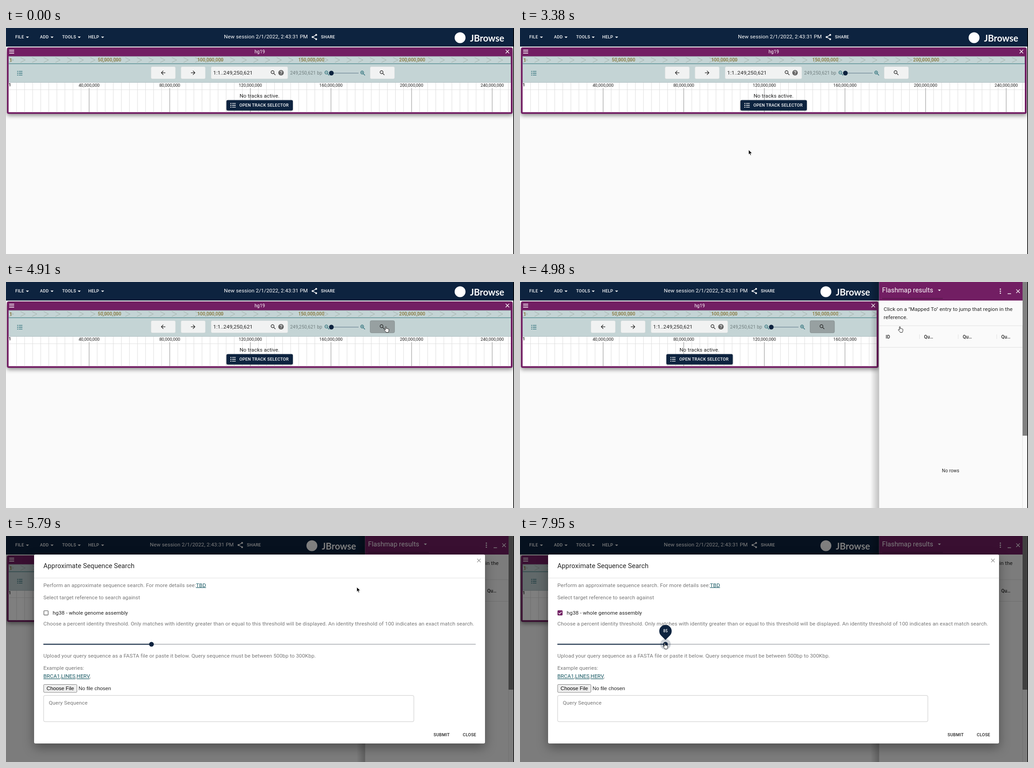
Recreate the animation shown at these times as an HTML page. Size 1121 by 500 pixels, loop 8000 ms.

```html
<!DOCTYPE html>
<html lang="en">
<head>
<meta charset="utf-8">
<title>Sequence search</title>
<style>
  html, body { margin: 0; width: 100%; height: 100%; overflow: hidden; background: #fafafa; }
  svg#stage { position: absolute; left: 0; top: 0; width: 1121px; height: 500px; }
  text { font-family: Roboto, sans-serif; white-space: pre; }
  .b1 { font-size: 11.63px; letter-spacing: .00938em; }
  .b2 { font-size: 10.18px; letter-spacing: .01071em; }
  .btn { font-size: 9.4px; font-weight: 500; letter-spacing: .02857em; }
  .h6 { font-size: 14.54px; letter-spacing: .0075em; }
  .arial { font: 11.35px "Liberation Sans", Arial, sans-serif; }
  .tick { font-size: 9.45px; }
  .brand { font: 700 20px Lato, sans-serif; }
  .c { text-anchor: middle; }
  .strong { font-weight: 500; }
  .white { fill: #fff; }
  .ink { fill: #212121; }
  .soft { fill: #757575; }
  .navy { fill: #0d233f; }
  .grape { fill: #721e63; }
  .teal { fill: #2b6f79; }
  .link { fill: #135560; text-decoration: underline; }
  .olive { fill: #867638; }
  .line { fill: none; stroke: #e0e0e0; }
  .box { fill: #f1f2f2; stroke: #d3dbdb; stroke-width: .8; }
  .frame { width: 1116px; filter: drop-shadow(0 4px 5px rgba(0,0,0,.42)); }
  .inner { width: 1108.5px; }
  .open .frame { width: 789px; }
  .open .inner { width: 781.5px; }
  .open .mid { transform: translateX(-163.5px); }
  .open .end { transform: translateX(-327px); }
  #drawer { display: none; }
  .open #drawer { display: inline; }
  #paper { filter: drop-shadow(0 9px 12px rgba(0,0,0,.36)); }
  #tip { transform-origin: 321px 230px; }
</style>
</head>
<body>
<svg id="stage" viewBox="0 0 1121 500">
  <defs>
    <symbol id="search" viewBox="0 0 24 24"><path d="M15.5 14h-.79l-.28-.27C15.41 12.59 16 11.11 16 9.5 16 5.91 13.09 3 9.5 3S3 5.91 3 9.5 5.91 16 9.5 16c1.61 0 3.09-.59 4.23-1.57l.27.28v.79l5 4.99L20.49 19l-4.99-5zm-6 0C7.01 14 5 11.99 5 9.5S7.01 5 9.5 5 14 7.01 14 9.5 11.99 14 9.5 14z"/></symbol>
    <symbol id="share" viewBox="0 0 24 24"><path d="M18 5 6 12l12 7" fill="none" stroke="#fff" stroke-width="2"/><circle cx="18" cy="5" r="3"/><circle cx="6" cy="12" r="3"/><circle cx="18" cy="19" r="3"/></symbol>
    <symbol id="back" viewBox="0 0 24 24"><path d="M20 11H7.83l5.59-5.59L12 4l-8 8 8 8 1.41-1.41L7.83 13H20v-2z"/></symbol>
    <symbol id="next" viewBox="0 0 24 24"><path d="M12 4l-1.41 1.41L16.17 11H4v2h12.17l-5.58 5.59L12 20l8-8z"/></symbol>
    <symbol id="help" viewBox="0 0 24 24"><path d="M12 2C6.48 2 2 6.48 2 12s4.48 10 10 10 10-4.48 10-10S17.52 2 12 2zm1 17h-2v-2h2v2zm2.07-7.75l-.9.92C13.45 12.9 13 13.5 13 15h-2v-.5c0-1.1.45-2.1 1.17-2.83l1.24-1.26c.37-.36.59-.86.59-1.41 0-1.1-.9-2-2-2s-2 .9-2 2H8c0-2.21 1.79-4 4-4s4 1.79 4 4c0 .88-.36 1.68-.93 2.25z"/></symbol>
    <symbol id="close" viewBox="0 0 24 24"><path d="M19 6.41L17.59 5 12 10.59 6.41 5 5 6.41 10.59 12 5 17.59 6.41 19 12 13.41 17.59 19 19 17.59 13.41 12z"/></symbol>
    <symbol id="list" viewBox="0 0 12 10"><path d="M0 0h2.2v1.8H0zM0 4.1h2.2v1.8H0zM0 8.2h2.2V10H0zM3.7.2H12v1.4H3.7zM3.7 4.3H12v1.4H3.7zM3.7 8.4H12v1.4H3.7z"/></symbol>
    <symbol id="caret" viewBox="0 0 8 4"><path d="M0 0h8L4 4z"/></symbol>
    <clipPath id="viewClip"><rect class="inner" x="5.5" y="62.5" height="124"/></clipPath>
    <clipPath id="goClip"><rect x="803.5" y="85.5" width="54" height="27" rx="3"/></clipPath>
    <linearGradient id="edge"><stop offset="0" stop-opacity="0"/><stop offset="1" stop-opacity=".24"/></linearGradient>
  </defs>

  <rect width="1121" height="500" fill="#fafafa"/>

  <!-- app bar -->
  <rect class="navy" width="1120" height="41"/>
  <g class="white btn">
    <text x="20.5" y="23.4">FILE</text><text x="75" y="23.4">ADD</text>
    <text x="124" y="23.4">TOOLS</text><text x="181.5" y="23.4">HELP</text>
    <use href="#caret" x="43.7" y="18.7" width="7.2" height="3.6"/>
    <use href="#caret" x="98" y="18.7" width="7.2" height="3.6"/>
    <use href="#caret" x="158" y="18.7" width="7.2" height="3.6"/>
    <use href="#caret" x="209.6" y="18.7" width="7.2" height="3.6"/>
  </g>
  <g class="mid white">
    <text class="b1" x="481" y="23.4">New session 2/1/2022, 2:43:31 PM</text>
    <use href="#share" x="672.5" y="12" width="16" height="16"/>
    <text class="btn" x="695" y="23.4">SHARE</text>
  </g>
  <g class="end white">
    <circle cx="1002" cy="21.5" r="12"/>
    <text class="brand" x="1024" y="30">JBrowse</text>
  </g>

  <!-- genome view -->
  <rect class="frame grape" x="2" y="43" height="147" rx="4"/>
  <path d="M7 49h11M7 52.4h11M7 55.8h11" stroke="#fff" stroke-width="1.4"/>
  <text class="mid white b2 c" x="560" y="55.6">hg19</text>
  <use class="end white" href="#close" x="1099" y="44.5" width="15" height="15"/>
  <g clip-path="url(#viewClip)">
    <rect x="5.5" y="62.5" width="1109" height="58" fill="#c4d4d5"/>
    <path id="chevrons" fill="none" stroke="#a3b1aa" stroke-width="1"/>
    <path d="M5.5 63H1114M1113.5 63v16" stroke="#9bb3b3" stroke-width=".8"/>
    <path d="M5.5 79H1114" stroke="#5b9196" stroke-width="1.4"/>
    <text class="olive b2" x="7.5" y="74.6" font-weight="700">1</text>
    <g id="overview" class="olive b2 c strong"></g>

    <use class="teal" href="#list" x="24.5" y="95" width="12" height="10"/>
    <g class="mid">
      <rect class="box" x="320" y="85.5" width="54" height="27" rx="3"/>
      <rect class="box" x="386" y="85.5" width="54" height="27" rx="3"/>
      <rect class="box" x="452.5" y="85.5" width="169.5" height="27" rx="3"/>
      <use class="ink" href="#back" x="339.5" y="91.8" width="14.5" height="14.5"/>
      <use class="ink" href="#next" x="405.7" y="91.8" width="14.5" height="14.5"/>
      <text class="b1 ink" x="457.3" y="103.3">1:1..249,250,621</text>
      <use class="ink" href="#search" x="582.5" y="92" width="14.5" height="14.5"/>
      <use fill="#666" href="#help" x="599.7" y="91.8" width="14.5" height="14.5"/>
      <text class="b2" fill="#6f7d7e" x="627" y="103.2">249,250,621 bp</text>
      <use class="teal" href="#search" x="701.2" y="92.8" width="14.5" height="14.5"/>
      <path d="M705.2 98.5h3.6M784.2 98.5h3.6M786 96.7v3.6" stroke="#2b6f79" stroke-width=".9"/>
      <use class="teal" href="#search" x="780.2" y="92.8" width="14.5" height="14.5"/>
      <path d="M718 99.8h60" stroke="#7d93a0" stroke-width="1.4"/>
      <circle class="navy" cx="718" cy="99.8" r="5.2"/>
      <rect id="go" class="box" x="803.5" y="85.5" width="54" height="27" rx="3"/>
      <g clip-path="url(#goClip)"><circle id="ripple" cx="836" cy="99" fill-opacity=".17"/></g>
      <use class="ink" href="#search" x="823" y="92" width="14.5" height="14.5"/>
    </g>

    <rect x="5.5" y="120.5" width="1109" height="66" fill="#fff"/>
    <path d="M5.5 120.5H1114" stroke="#a9c0c1" stroke-width=".8"/>
    <path id="minor" stroke="#dedede" stroke-width="1"/>
    <path d="M5.5 136.5H1114" stroke="#dcdcdc" stroke-width=".8"/>
    <path id="major" stroke="#8f8f8f" stroke-width="1"/>
    <text class="tick" x="5.8" y="129.4" font-weight="500">1</text>
    <g id="scale" class="tick c ink"></g>

    <g class="mid">
      <text class="b1 ink c" x="559.5" y="154.3">No tracks active.</text>
      <rect class="navy" x="486.5" y="159.5" width="146.5" height="23" rx="3" style="filter:drop-shadow(0 1.5px 1.5px rgba(0,0,0,.35))"/>
      <use class="white" href="#list" x="495" y="166" width="12" height="10"/>
      <text class="btn white" x="515" y="174.2">OPEN TRACK SELECTOR</text>
    </g>
  </g>

  <g id="drawer">
    <rect x="773" width="20" height="500" fill="url(#edge)"/>
    <rect x="792.5" width="328" height="500" fill="#fafafa"/>
    <rect class="grape" x="792.5" width="317" height="41"/>
    <text class="h6 white" x="799" y="23.4">Flashmap results</text>
    <path d="M799 36.3h134" stroke="#47123e"/>
    <use class="white" href="#caret" x="922" y="16.6" width="7" height="3.5"/>
    <g class="white">
      <circle cx="1060" cy="15.8" r="1.4"/><circle cx="1060" cy="20.3" r="1.4"/><circle cx="1060" cy="24.8" r="1.4"/>
      <rect x="1076" y="25.2" width="7.5" height="1.4"/>
      <use href="#close" x="1091.5" y="12.8" width="15" height="15"/>
    </g>
    <text class="b1 ink" x="802.5" y="64.2">Click on a "Mapped To" entry to jump that region in the</text>
    <text class="b1 ink" x="802.5" y="82">reference.</text>
    <path class="line" d="M793 96.8h316M793 144.5h316M1109 97v403M881.5 116v10M967 116v10M1052 116v10"/>
    <g class="b2 ink strong">
      <text x="807" y="124.6">ID</text><text x="891.5" y="124.6">Qu…</text>
      <text x="977" y="124.6">Qu…</text><text x="1062" y="124.6">Qu…</text>
    </g>
    <text class="b2 ink c" x="950.3" y="421">No rows</text>
    <rect x="1109" width="10.5" height="340" fill="#808080"/>
  </g>

  <g id="dialog">
    <rect width="1119.5" height="500" fill-opacity=".5"/>
    <rect id="paper" class="white" x="62" y="41" width="995" height="418" rx="3"/>
    <text class="h6 ink" x="82.5" y="70.8">Approximate Sequence Search</text>
    <use fill="#8c8c8c" href="#close" x="1036.3" y="47" width="14.5" height="14.5"/>
    <path class="line" d="M62 93h995"/>
    <g class="b1 soft">
      <text x="82.5" y="112.6">Perform an approximate sequence search. For more details see:<tspan class="link">TBD</tspan></text>
      <text x="82.5" y="139.8">Select target reference to search against</text>
      <text x="82.5" y="198">Choose a percent identity threshold. Only matches with identity greater than or equal to this threshold will be displayed. An identity threshold of 100 indicates an exact match search.</text>
      <text x="82.5" y="268.7">Upload your query sequence as a FASTA file or paste it below. Query sequence must be between 500bp to 300Kbp.</text>
      <text x="82.5" y="295.8">Example queries:</text>
      <text x="82.5" y="314.4"><tspan class="link">BRCA1</tspan>,<tspan class="link">LINES</tspan>,<tspan class="link">HERV</tspan>,</text>
      <text x="94.5" y="372.5">Query Sequence</text>
    </g>
    <rect x="83.6" y="165.4" width="9.4" height="9.4" rx="1" fill="#fff" stroke="#6a6a6a" stroke-width="1.4"/>
    <g id="checked">
      <rect class="grape" x="82.8" y="164.6" width="11" height="11" rx="1.4"/>
      <path d="M85 170.2l2.4 2.4 4.4-4.7" fill="none" stroke="#fff" stroke-width="1.4"/>
    </g>
    <text class="b1 ink" x="103" y="173.8">hg38 - whole genome assembly</text>
    <path d="M82.5 239.5h954" stroke="#a3a7ad" stroke-width="1.6"/>
    <path d="M82.5 239.5H321" stroke="#0d233f" stroke-width="1.8"/>
    <circle id="halo" class="navy" cx="321" cy="239.5" r="11.7" fill-opacity=".2"/>
    <circle class="navy" cx="321" cy="239.5" r="5.2"/>
    <g id="tip">
      <path class="navy" d="M321 230l-9.7-9.8a13.7 13.7 0 1 1 19.4 0z"/>
      <text class="white c" x="321" y="213.4" font-size="8.7" font-weight="500">85</text>
    </g>
    <rect x="83" y="328.5" width="73.5" height="17.5" rx="2" fill="#efefef" stroke="#767676" stroke-width=".9"/>
    <text class="arial" x="89.5" y="341">Choose File</text>
    <text class="arial" x="160" y="341" fill="#222">No file chosen</text>
    <rect x="83" y="352.8" width="817" height="58" rx="3" fill="none" stroke="#c2c2c2" stroke-width=".9"/>
    <text class="btn ink" x="943.5" y="443.3">SUBMIT</text>
    <text class="btn ink" x="1008" y="443.3">CLOSE</text>
  </g>

  <rect x="1119.5" width="1.5" height="500"/>

  <g id="cursor">
    <path id="arrow" d="M.4.6v10.3l2.3-2.1 1.7 3.9 1.8-.8-1.7-3.7h3.7z" stroke="#fff" stroke-width=".8"/>
    <path id="hand" d="M3.2 8V1.7c0-1.4 2-1.4 2 0v3.6c.3-.9 1.8-.8 2 .2.4-.7 1.7-.5 1.9.5.6-.5 1.8-.2 1.8.8v3c0 1.9-1.2 2.4-1.3 3.8H4.9C4.6 11.8 2.3 10.6.9 8.5.3 7.3 1.5 6.6 2.3 7.3z" fill="#f5f5f5" stroke="#111" stroke-width=".9"/>
    <path id="beam" d="M.5.5q2 0 2 1.5v9.500q0 1.500-2 1.500M4.500.5q-2 0-2 1.500v9.500q0 1.500 2 1.500M1.500 8.500h2" fill="none" stroke="#222" stroke-width=".9"/>
  </g>
</svg>
<script>
  const $ = id => document.getElementById(id);
  const LOOP = 8000;
  const smooth = p => p * p * (3 - 2 * p);
  const easeOut = p => 1 - (1 - p) ** 3;

  // Static rulers
  const label = (group, x, y, n) => {
    const t = document.createElementNS("http://www.w3.org/2000/svg", "text");
    t.setAttribute("x", x);
    t.setAttribute("y", y);
    t.textContent = n.toLocaleString("en-US");
    $(group).append(t);
  };
  let chevrons = "", minor = "", major = "";
  for (let i = 0; i < 43; i++) chevrons += `M${6.3 + i * 25.7} 65.5l10.5 5.300-10.500 5.300`;
  for (let i = 1; i <= 62; i++) {
    const x = 5.5 + i * 17.79;
    if (i % 10) {
      minor += `M${x} 121V186.5`;
    } else {
      major += `M${x} 133V186.5`;
      label("scale", x, 129.6, i * 4e6);
    }
  }
  for (let i = 1; i < 5; i++) label("overview", 5.8 + i * 222.65, 73.6, i * 5e7);
  $("chevrons").setAttribute("d", chevrons);
  $("minor").setAttribute("d", minor);
  $("major").setAttribute("d", major);

  // Pointer moves: each is stepped, and switches shape at progress `at`
  const moves = [
    { t0: 1740, t1: 1980, n: 4, from: [767, 267], to: [504, 269], bend: 12, kinds: ["arrow", "arrow"] },
    { t0: 3380, t1: 3700, n: 5, from: [504, 269], to: [793, 113], kinds: ["arrow", "arrow"] },
    { t0: 3860, t1: 4170, n: 5, from: [793, 113], to: [834, 98], kinds: ["arrow", "hand"], at: .5 },
    { t0: 5700, t1: 6020, n: 5, from: [834, 98], to: [448, 191], kinds: ["arrow", "beam"], at: 1 },
    { t0: 6180, t1: 6970, n: 11, from: [448, 191], to: [241, 170], ease: [easeOut, p => p], kinds: ["beam", "hand"], at: .55 },
    { t0: 7460, t1: 7950, n: 7, from: [241, 170], to: [315, 236.500], kinds: ["arrow", "hand"], at: .8 }
  ];

  // Progress 0..1 in n even steps, the first of them at t0
  const stepped = (t, t0, t1, n) =>
    Math.max(0, Math.min(1, Math.floor((t - t0 + 5) / (t1 - t0) * (n - 1)) / (n - 1)));

  function pointer(t) {
    const m = moves.filter(m => t >= m.t0).pop();
    if (!m) return { x: 767, y: 267, kind: "arrow" };
    const p = stepped(t, m.t0, m.t1, m.n);
    const [ex, ey] = m.ease || [smooth, smooth];
    const mix = (i, e) => m.from[i] + (m.to[i] - m.from[i]) * e(p);
    return {
      x: mix(0, ex),
      y: mix(1, ey) + (m.bend || 0) * Math.sin(Math.PI * p),
      kind: m.kinds[p >= (m.at ?? 1) ? 1 : 0]
    };
  }

  const show = (id, on) => { $(id).style.display = on ? "inline" : "none"; };

  function draw(t) {
    const { x, y, kind } = pointer(t);
    show("cursor", t >= 250);
    $("cursor").setAttribute("transform", `translate(${x} ${y})`);
    for (const k of ["arrow", "hand", "beam"]) show(k, k === kind);

    const hover = stepped(t, 3940, 4170, 4);
    const tint = (a, b) => Math.round(a + (b - a) * hover);
    $("go").style.fill = `rgb(${tint(241, 182)},${tint(242, 192)},${tint(242, 193)})`;
    $("go").style.stroke = `rgb(${tint(211, 140)},${tint(219, 152)},${tint(219, 154)})`;
    $("ripple").setAttribute("r", t < 4500 ? 0 : 8 + 34 * stepped(t, 4500, 4900, 6));

    $("stage").classList.toggle("open", t >= 4980);
    show("dialog", t >= 5050);
    $("dialog").style.opacity = t < 5130 ? .955 : t < 5210 ? .99 : 1;
    show("checked", t >= 7210);

    show("halo", t >= 7865);
    show("tip", t >= 7865);
    $("tip").style.transform = `scale(${t < 7945 ? .6 : 1})`;
  }

  const start = performance.now();
  function tick() {
    draw((performance.now() - start) % LOOP);
    requestAnimationFrame(tick);
  }
  tick();
</script>
</body>
</html>
```
